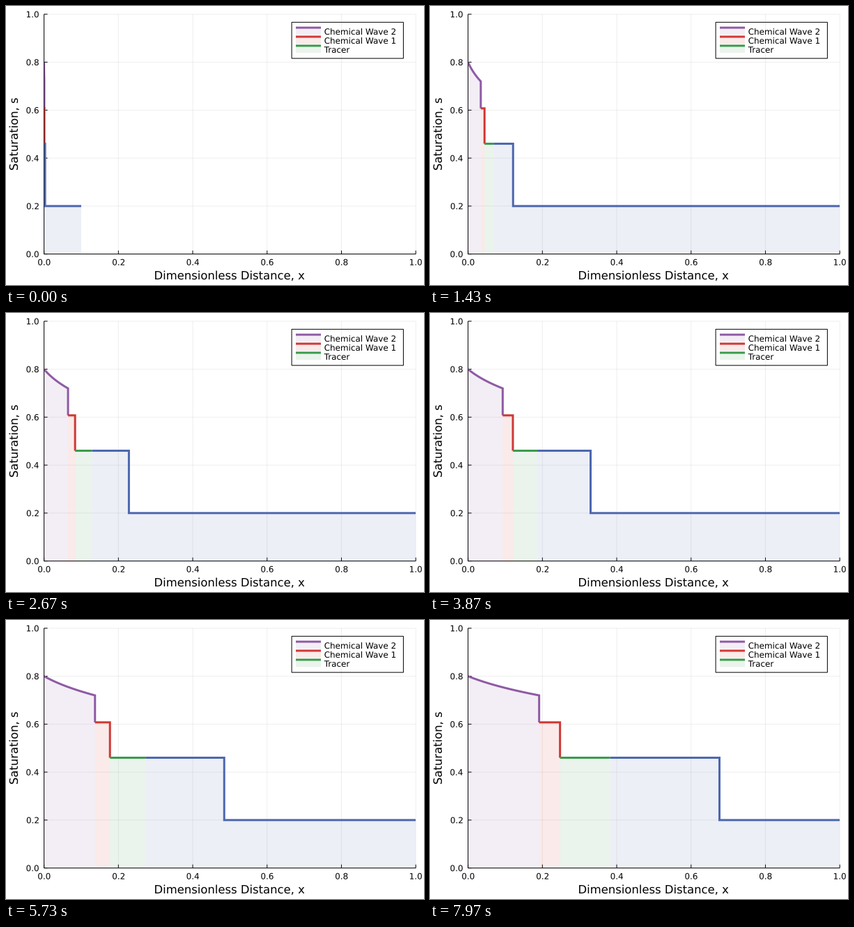
Recreate the animation shown at these times as a matplotlib script. Size 600x400 px, loop 8000 ms.

```python
import numpy as np
import matplotlib.pyplot as plt
from matplotlib.animation import FuncAnimation
from matplotlib.patches import PathPatch, Polygon, Rectangle
from matplotlib.textpath import TextPath
from matplotlib.transforms import Affine2D

W, H, DPI = 600, 400, 100
FRAMES, LOOP_MS = 240, 8000
PURPLE, RED, GREEN, BLUE = "#8f5aa5", "#ce3935", "#3a9a4b", "#4c67b0"
FILL_ALPHA = 0.1
LINE = dict(solid_capstyle="butt", solid_joinstyle="miter")

# Plot area in pixels from the top left
LEFT, RIGHT, TOP, BOTTOM = 54.6, 588.2, 11.8, 355.6

# Distance each front travels per frame
V_WAVE2, V_WAVE1, V_TRACER, V_FRONT, V_END = 0.000797, 0.001031, 0.001594, 0.002818, 0.1
S_INJ, S_WAVE2, S_WAVE1, S_BANK, S_INIT = 0.8, 0.72, 0.6075, 0.46, 0.2

plt.rcParams["font.family"] = "DejaVu Sans"
plt.rcParams["path.snap"] = False


def px(n):
    """Pixels to points."""
    return n * 72 / DPI


def wave_speed(s):
    """Fractional-flow slope, scaled to end at V_WAVE2."""
    u = (S_INJ - s) / 0.6
    m = 1 - u
    v = u / m**3 / (1 + 0.6 * u**2 / m**2) ** 2
    return v / v[-1] * V_WAVE2


rare_s = np.linspace(S_INJ, S_WAVE2, 40)
rare_v = wave_speed(rare_s)

fig = plt.figure(figsize=(W / DPI, H / DPI), dpi=DPI, facecolor="white")

# Static page measured in pixels, with the moving data on top
page = fig.add_axes([0, 0, 1, 1])
page.set(xlim=(0, W), ylim=(H, 0))
page.axis("off")
ax = fig.add_axes([LEFT / W, 1 - BOTTOM / H, (RIGHT - LEFT) / W, (BOTTOM - TOP) / H])
ax.set(xlim=(0, 1), ylim=(0, 1))
ax.axis("off")


def stroke(x, y, color="black", width=1, alpha=1):
    page.plot(x, y, color=color, linewidth=px(width), alpha=alpha, **LINE)


def label(x, y, text, size, align=0.5, angle=0):
    """Text outline on a baseline; align 0 is left, 0.5 centre, 1 right."""
    path = TextPath((0, 0), text, size=size)
    box = path.get_extents()
    shift = 0 if align == 0 else -(box.x0 + align * box.width)
    place = Affine2D().translate(shift, 0).scale(1, -1).rotate_deg(-angle).translate(x, y)
    page.add_patch(PathPatch(place.transform_path(path), color="black", linewidth=0))


for t in np.linspace(0, 1, 6):
    x = LEFT + (RIGHT - LEFT) * t
    y = BOTTOM - (BOTTOM - TOP) * t
    stroke([x, x], [TOP, BOTTOM], alpha=0.065)
    stroke([LEFT, RIGHT], [y, y], alpha=0.065)
    stroke([x, x], [BOTTOM, BOTTOM - 5])
    stroke([LEFT, LEFT + 5], [y, y])
    label(x + 0.2, 371.6, f"{t:.1f}", 11.95)
    label(46.8, y + 4.5, f"{t:.1f}", 11.95, align=1)
stroke([LEFT, LEFT], [TOP, BOTTOM])
stroke([LEFT, RIGHT], [BOTTOM, BOTTOM])
label(321.2, 392, "Dimensionless Distance, x", 16.43)
label(16.9, 183.6, "Saturation, s", 16.43, angle=90)

# Legend
box_top, row = 23.3, 12.95
page.add_patch(Rectangle((410.1, box_top), 160.3, 4 * row, facecolor="white",
                         edgecolor="black", linewidth=px(1)))
entries = [("Chemical Wave 2", PURPLE), ("Chemical Wave 1", RED), ("Tracer", GREEN)]
for i, (name, color) in enumerate(entries, 1):
    mid = box_top + row * i
    y = mid - 0.4 * row
    page.add_patch(Rectangle((416, y), 36, 0.8 * row, color=color,
                             alpha=FILL_ALPHA, linewidth=0))
    stroke([416, 452], [y, y], color, 3)
    label(456.7, mid + 4.8, name, 11.95, align=0)


def make_zone(color):
    area = Polygon([(0, 0), (0, 0), (0, 0)], facecolor=color, alpha=FILL_ALPHA, linewidth=0)
    ax.add_patch(area)
    line, = ax.plot([], [], color=color, linewidth=px(3), **LINE)
    return area, line


zones = [make_zone(c) for c in (PURPLE, RED, GREEN, BLUE)]


def profiles(t):
    a, b, c, d = (v * t for v in (V_WAVE2, V_WAVE1, V_TRACER, V_FRONT))
    end = min(V_END * t, 1)
    yield np.append(rare_v * t, a), np.append(rare_s, S_WAVE1)
    yield [a, b, b], [S_WAVE1, S_WAVE1, S_BANK]
    yield [b, c], [S_BANK, S_BANK]
    yield [c, d, d, end], [S_BANK, S_BANK, S_INIT, S_INIT]


def update(i):
    for (area, line), (x, s) in zip(zones, profiles(i + 1)):
        line.set_data(x, s)
        area.set_xy([(x[0], 0), *zip(x, s), (x[-1], 0)])
    return [artist for zone in zones for artist in zone]


anim = FuncAnimation(fig, update, frames=FRAMES, interval=LOOP_MS / FRAMES,
                     repeat=True, repeat_delay=0, blit=False)
plt.show()
```
